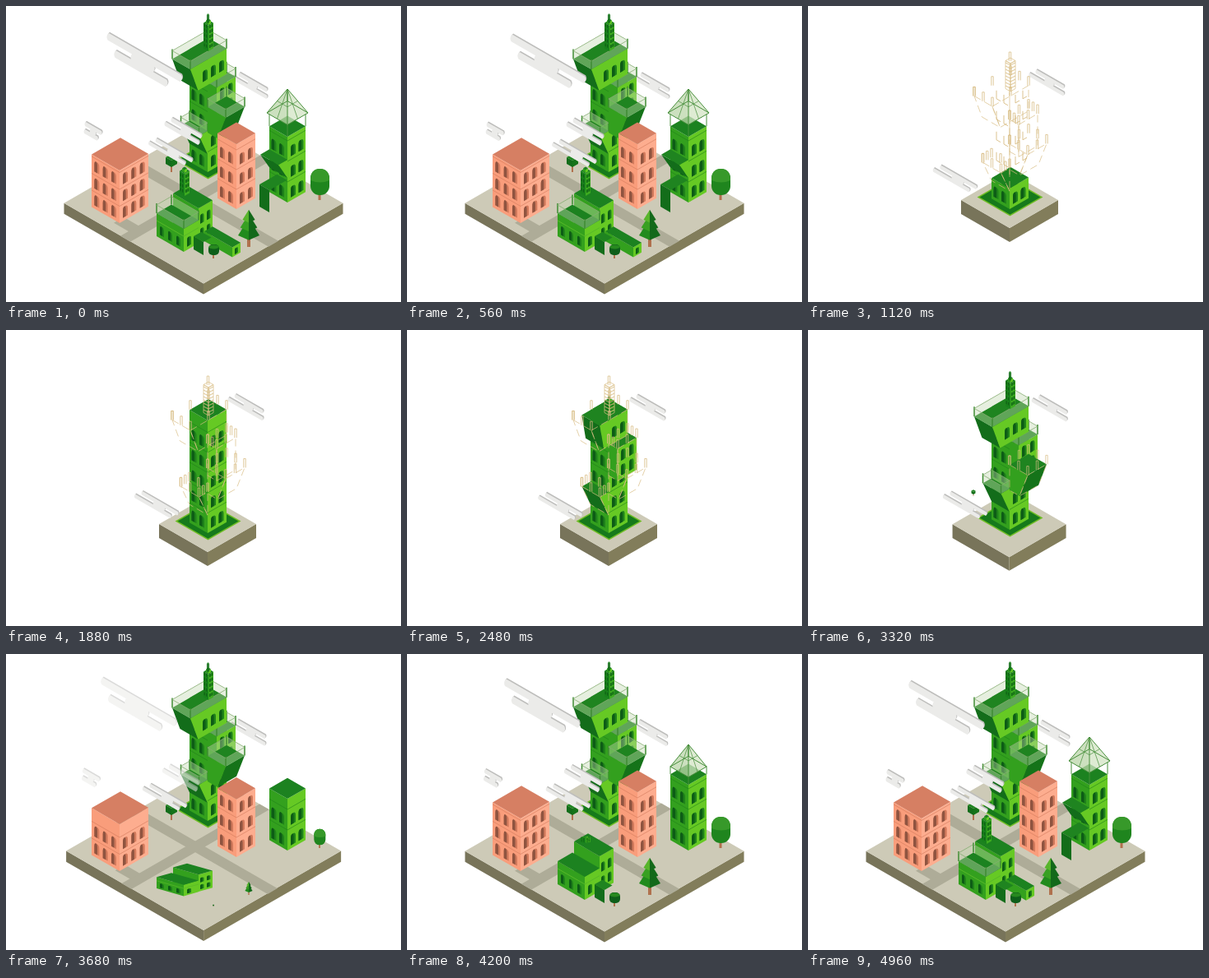
Recreate the animation shown at these times as an HTML page. Size 480x360 px, loop 5 s.

```html
<!DOCTYPE html>
<html lang="en">
<head>
<meta charset="utf-8">
<title>Isometric green city</title>
<style>
html, body { margin: 0; width: 100%; height: 100%; overflow: hidden; background: #fff; }
svg { display: block; width: 100vw; height: 100vh; }
</style>
</head>
<body>
<svg id="stage" viewBox="0 0 480 360"></svg>
<script>
const LOOP = 5000, CUT = 700, K = 0.577;
// Colours are ordered left side, right side, top.
const GREEN = ['#33a01e', '#66c924', '#1c8220'];
const DARK = ['#136d1a', '#157319', '#1f8420'];
const PINK = ['#f99d7b', '#fdad8f', '#d67f63'];
const GREEN_WIN = ['#1f821a', '#0d5c16'];
const PINK_WIN = ['#d27a5c', '#8f5440'];
const WIRE = '#d9bd84';
const stage = document.getElementById('stage');

const mix = (a, b, p) => a + (b - a) * p;
const part = (t, a, b) => Math.min(1, Math.max(0, (t - a) / (b - a)));
const inOut = p => p < 0.5 ? 4 * p ** 3 : 1 - (2 - 2 * p) ** 3 / 2;
const out = p => 1 - (1 - p) ** 3;
const seq = (n, from, step) => Array.from({ length: n }, (_, i) => from + i * step);

const poly = (fill, ...pts) => `<polygon points="${pts}" fill="${fill}"/>`;
const line = (color, width, ...pts) =>
  `<polyline points="${pts}" fill="none" stroke="${color}" stroke-width="${width}"/>`;
const group = (attrs, body) => `<g ${attrs}>${body}</g>`;
const fade = (o, body) => o > 0 ? group(`opacity="${o}"`, body) : '';
const shift = (y, body) => group(`transform="translate(0 ${y})"`, body);
const grow = (p, x, y, body, sx = p) => p > 0
  ? group(`transform="translate(${x} ${y}) scale(${sx} ${p}) translate(${-x} ${-y})"`, body) : '';

// Projection around a ground point: u runs down-right, v down-left, z up.
const iso = (x, y) => (u, v, z) => [x + u - v, y + (u + v) * K - z];

// Left, right and top faces; fu and fv pull the foot in to make a taper.
function faces(o, [u0, u1], [v0, v1], [z0, z1], fu = u1, fv = v1) {
  return [
    [o(u0, v1, z1), o(u1, v1, z1), o(fu, fv, z0), o(u0, fv, z0)],
    [o(u1, v1, z1), o(u1, v0, z1), o(fu, v0, z0), o(fu, fv, z0)],
    [o(u0, v1, z1), o(u1, v1, z1), o(u1, v0, z1), o(u0, v0, z1)]
  ];
}
const solid = (cols, ...shape) => faces(...shape).map((f, i) => poly(cols[i], f)).join('');
const box = (x, y, a, b, h, cols) => solid(cols, iso(x, y), [-a, 0], [-b, 0], [0, h]);

// Arched windows beside the corner (x, y); side -1 is left, 1 is right.
function arches(x, y, side, us, vs, w, h, limit, [pale, dark]) {
  const arch = (u, v, w) => {
    const at = (du, dv) => `${x + side * (u + du)} ${y - (u + du) * K - v - dv}`;
    return `M${at(0, 0)}L${at(0, h * 0.7)}Q${at(0, h)} ${at(w / 2, h)}` +
      `Q${at(w, h)} ${at(w, h * 0.7)}L${at(w, 0)}Z`;
  };
  let wide = '', thin = '';
  for (const v of vs) if (v + h <= limit) for (const u of us) {
    wide += arch(u, v, w);
    thin += arch(side < 0 ? u + w * 0.4 : u, v, w * 0.6);
  }
  return `<path d="${wide}" fill="${pale}"/><path d="${thin}" fill="${dark}"/>`;
}
const bothSides = (x, y, ...rest) => arches(x, y, -1, ...rest) + arches(x, y, 1, ...rest);

// Building of equal storeys, cut off at its current height.
function block(x, y, a, b, h, storey, cols, win, n, w) {
  if (h <= 0) return '';
  let s = box(x, y, a, b, h, cols);
  for (let z = storey; z < h - 2; z += storey)
    s += line(win[0], 0.6, x - a, y - a * K - z, x, y - z, x + b, y - b * K - z);
  return s + bothSides(x, y, seq(n, 4, (a - 3) / n), seq(6, 4, storey), w, 13, h, win);
}

// Thin striped mast with a small cap.
function mast(x, y, r, h) {
  return box(x, y, r, r, h, ['#18821b', '#3dab20', GREEN[2]]) +
    bothSides(x, y, [r * 0.2, r * 0.6], seq(Math.floor(h / 6), 3, 6), r * 0.3, 4, h, GREEN_WIN) +
    box(x, y - h - 1, r / 2, r / 2, 4, GREEN);
}

const ring = (o, [u0, u1], [v0, v1], z) =>
  [[u0, v1], [u0, v0], [u1, v0], [u1, v1], [u0, v1]].map(([u, v]) => o(u, v, z));

function rail(o, u, v, z, h = 10) {
  const pts = ring(o, u, v, z);
  let glass = '', posts = '';
  for (let i = 0; i < 4; i++) {
    const [x, y] = pts[i], [x2, y2] = pts[i + 1];
    glass += poly('#c3d8b0', x, y, x2, y2, x2, y2 - h, x, y - h);
    posts += line('#3f8c33', 1.5, x, y, x, y - h - 2) + line('#86ad72', 0.8, x, y - h, x2, y2 - h);
  }
  return group('opacity=".4"', glass) + posts;
}

// Open porch: a roof and one wall.
function porch(o, u, v, z) {
  const [wall, , roof] = faces(o, u, v, z);
  return poly(DARK[2], roof) + poly(DARK[0], wall);
}

// Two parallel bars joined by a short one; the lower starts at dx.
function cloud(x, y, len, th, dx, low) {
  const bar = (from, to, drop, ox, oy) => {
    const n = (to - from) * len;
    return `M${x + from * len + ox} ${y + from * len * K + drop * th + oy}l${n} ${n * K}` +
      `q${th / 3} ${th * 0.6} ${-th / 6} ${th}l${-n} ${-n * K}q${-th / 3} ${-th * 0.6} ${th / 6} ${-th}z`;
  };
  const shape = (fill, ox, oy) => `<path fill="${fill}" d="${bar(0, 1, 0, ox, oy)}` +
    `${bar(dx, dx + low, 1.9, ox, oy)}${bar(0.33, 0.62, 0.95, ox, oy)}"/>`;
  return shape('#bdbdbb', 1, -1.2) + shape('#ebebe9', 0, 0);
}

function base(e, start) {
  const w = mix(59, 169.5, e) * start, x = mix(245, 240, e), y = mix(236, 239.7, e);
  const th = mix(17, 13, e), h = w * K;
  const road = (x1, y1, len, dir) => {
    const x2 = x1 + len, y2 = y1 + dir * len * K;
    return poly('#aeac98', x1, y1, x2, y2, x2 + 12, y2 - dir * 7, x1 + 12, y1 - dir * 7);
  };
  const roads = road(149, 195, 170, 1) + road(139, 280, 170, -1) + road(131, 264, 19, 1);
  return poly('#78745a', x - w, y, x, y + h, x, y + h + th, x - w, y + th) +
    poly('#827d5b', x + w, y, x, y + h, x, y + h + th, x + w, y + th) +
    poly('#cdcab7', x - w, y, x, y - h, x + w, y, x, y + h) +
    group(`transform="translate(${x} ${y}) scale(${w / 169.5}) translate(-240 -240)"`,
      fade(part(e, 0.25, 0.7), roads));
}

// Overhangs of the tall tower: extent, height, how far the foot reaches, timing.
const foot = iso(245, 247);
const OVERHANGS = [
  { u: [0, 11], v: [-23, 0], z: [70, 109], reach: 1, from: 2000, to: 2450, fence: 2950 },
  { u: [-22, 0], v: [-23, 21], z: [106, 137], reach: 0.55, from: 2300, to: 2660, fence: 2950 },
  { u: [-22, 0], v: [0, 10.5], z: [22, 50], reach: 0, from: 2000, to: 2450, fence: 2950 },
  { u: [0, 22], v: [-23, 0], z: [48, 79], reach: 0.55, from: 2700, to: 3100, fence: 3350 }
];

function overhang({ u, v, z, reach, from, to, fence }, t) {
  const p = inOut(part(t, from, to));
  if (!p) return '';
  const u1 = u[1] * p, v1 = v[1] * p, fu = u1 * reach, fv = v1 * reach;
  const cols = [fv < v1 ? DARK[0] : GREEN[0], fu < u1 ? DARK[1] : GREEN[1], DARK[2]];
  let s = solid(cols, foot, [u[0], u1], [v[0], v1], z, fu, fv);
  if (reach === 1) {
    const [x, y] = foot(u1, 0, z[0]);
    s += arches(x, y, 1, [4, 14], [4, 22], 5.5, 13, 99, GREEN_WIN);
  } else if (fu === u1 && z[1] > 100) {
    s += arches(245, 247, 1, seq(p > 0.6 ? 3 : 2, p > 0.6 ? -6 : 4, 10), [113], 6, 13, 999, GREEN_WIN);
  }
  return s + fade(part(t, fence, fence + 200), rail(foot, u, v, z[1]));
}

function wires(t) {
  const post = ([x, y]) => line(WIRE, 0.8, x - 1.2, y, x - 1.2, y - 11, x + 1.2, y - 11, x + 1.2, y);
  const edge = f => line(WIRE, 0.7, f, f[0]);
  const shown = end => part(t, 740, 1000) * (1 - part(t, end - 200, end));
  let s = '';
  for (const { u, v, z, reach, to } of OVERHANGS) {
    const sides = faces(foot, u, v, z, u[1] * reach, v[1] * reach).slice(0, 2);
    const pts = ring(foot, u, v, z[1]);
    const mid = pts.slice(1).map(([x, y], i) => [(x + pts[i][0]) / 2, (y + pts[i][1]) / 2]);
    s += fade(shown(to + 400), group('stroke-dasharray="9 5"', sides.map(edge).join('')) +
      [...pts, ...mid].map(post).join(''));
  }
  let core = line(WIRE, 0.7, 245, 105, 245, 205);
  for (const z of seq(4, 50, 25)) for (const side of [-1, 1]) for (const d of [7, 16]) {
    const x = 245 + side * d, y = 247 - d * K - z;
    core += line(WIRE, 0.9, x, y - 10, x, y, x + 5, y - side * 5 * K);
  }
  const spire = seq(8, 72, 4).map(y => line(WIRE, 0.9, 240, y - 3, 246, y, 252, y - 3)).join('') +
    faces(iso(246, 104), [-6, 0], [-6, 0], [0, 34]).map(edge).join('') + post([245.5, 67]);
  return s + fade(shown(1850), core) + fade(shown(2850), spire);
}

function tower(t) {
  const pad = r => [245.5 - r, 232.5, 245.5, 232.5 - r * K, 245.5 + r, 232.5, 245.5, 232.5 + r * K];
  const h = 25 * out(part(t, 900, 1090)) + 112 * part(t, 1120, 1800);
  const spire = mast(246, 100, 6, 31) + box(245.5, 66, 1.5, 1.5, 10, DARK);
  return grow(out(part(t, 760, 920)), 245, 233, poly('#6fbd25', pad(40)) + poly('#167a1b', pad(37))) +
    block(245, 247, 22, 23, h, 24.5, GREEN, GREEN_WIN, 2, 6) +
    OVERHANGS.map(o => overhang(o, t)).join('') +
    grow(out(part(t, 2400, 2880)), 246, 100, spire, 1) + wires(t);
}

function glassTower(t) {
  const o = iso(342, 239), c = '#478f3b';
  let s = block(342, 239, 22, 22, 80 * out(part(t, 3480, 3980)), 25, GREEN, GREEN_WIN, 2, 6);
  const g = inOut(part(t, 4250, 4650)), w = mix(22, 25, g), y = mix(137, 130, g), peak = mix(110, 101, g);
  const top = [342, peak], L = [342 - w, y], R = [342 + w, y], F = [342, y + w * K], B = [342, y - w * K];
  const half = (a, b) => [(a[0] + b[0]) / 2, (a[1] + b[1]) / 2];
  const posts = [[-22, 0], [0, 0], [0, -22]].map(([u, v]) =>
    line(c, 1, o(u, v, 80), o(u, v, 80 + y * 0 + mix(10, 15, g)))).join('');
  const roof = posts +
    group('opacity=".75"', poly('#bcd6aa', L, top, F) + poly('#d3e5c5', R, top, F)) +
    line(c, 1, L, top, R, F, L, B, R) + line(c, 1, F, top, B) +
    line(c, 0.7, half(L, top), half(F, top), half(R, top)) +
    line(c, 0.7, half(L, F), top, half(R, F));
  s += grow(out(part(t, 3850, 4100)), 342, 150, roof);

  const p = inOut(part(t, 4350, 4700)), q = inOut(part(t, 4600, 4900));
  if (p) s += solid([DARK[0], GREEN[1], DARK[2]], o, [-22, 0], [0, 11 * p], [30, 52], 0, 0);
  if (q) s += porch(o, [-12.6, -0.6], [0, 21.4 * q], [0, 27]);
  return s;
}

function house(t) {
  const p = out(part(t, 3580, 4080)), o = iso(216, 299);
  const rear = box(234, 288, 31, 17, 42, GREEN) +
    arches(234, 288, 1, [2, 10], [5, 22], 4.5, 11, 99, GREEN_WIN);
  const front = box(216, 299, 33, 18, 28, GREEN) + bothSides(216, 299, [4], [4], 5, 11, 99, GREEN_WIN) +
    arches(216, 299, -1, [14, 24], [4], 5, 11, 99, GREEN_WIN) +
    line('#57b928', 1, o(-33, 0, 19), o(0, 0, 19), o(0, -18, 19));
  const stack = 0.22 * part(t, 4050, 4180) + 0.78 * out(part(t, 4220, 4600));
  let s = grow(p, 217, 290, rear, 1) + grow(stack, 217, 229, mast(217, 231, 6, 27), 1) +
    grow(p, 217, 290, front, 1) +
    fade(part(t, 4500, 4780), rail(o, [-33, 0], [-18, 0], 28));
  const len = 34 * part(t, 4867, 5000);
  if (len) {
    const x = 241 + len, y = 286 + len * K;
    s += box(x, y, len, 10, 12, GREEN) + arches(x, y, 1, [3], [2], 4, 7, 99, GREEN_WIN);
  }
  return s + grow(out(part(t, 3800, 4100)), 234, 285, porch(o, [3.5, 15.5], [-18, -8.5], [0, 16]));
}

function trees(t) {
  const trunk = (x, y, h, w = 2) =>
    `<rect x="${x - w / 2}" y="${y - h}" width="${w}" height="${h}" fill="#b0714e"/>`;
  const tier = i => {
    const w = 13 - i * 2.7, y = 279 - i * 9.5, top = y - w * 1.6, low = y + w * 0.45;
    return poly(['#218b1d', '#38a022', '#58b52c'][i], 295, top, 295 - w, y, 295, low) +
      poly('#13691a', 295, top, 295 + w, y, 295, low);
  };
  const pop = (from, x, y, body) => grow(out(part(t, from, from + 450)), x, y, body);
  return {
    cube: pop(3260, 201, 202, trunk(201, 202, 10) + box(201, 196, 7, 7, 8, DARK)),
    oak: pop(3560, 381, 236, trunk(381, 236, 12, 3) +
      '<rect x="370" y="198" width="23" height="32" rx="11" fill="#1f851e"/>' +
      '<path d="M370 212q0-14 11.500-14t11.500 14q-11 5-23 0z" fill="#37992a"/>'),
    fir: pop(3620, 295, 293, trunk(295, 293, 10, 4) + seq(3, 0, 1).map(tier).join('')),
    bush: pop(3660, 252, 307, trunk(252, 307, 8) +
      '<rect x="246" y="290" width="13" height="13" rx="5" fill="#0e5f1a"/>' +
      '<ellipse cx="252.500" cy="293" rx="6" ry="2.500" fill="#27891f"/>')
  };
}

function draw(now) {
  const t = now < CUT ? now + LOOP : now;
  const s = (t - LOOP) / 1000;
  const e = inOut(part(t, 3132, 3800));
  const lift = -45 * e, tree = trees(t);
  const drift = (v, x, y, ...form) => cloud(x + v * s, y + v * s * K, ...form);
  const rise = out(part(t, 3420, 3920));

  stage.innerHTML = base(e, out(part(t, CUT, CUT + 160))) +
    drift(1.6, 284, 81, 33, 4.5, -0.25, 1.25) + tree.cube +
    shift(lift, tower(t)) +
    shift(45 + lift, drift(5.5, 183, 161, 43, 4.5, -0.2, 1)) +
    block(280, 247, 23, 23, 79 * rise, 24, PINK, PINK_WIN, 2, 6) +
    glassTower(t) + tree.oak +
    block(138, 264, 34, 35, 64 * rise, 20.5, PINK, PINK_WIN, 3, 6) +
    house(t) + tree.bush + tree.fir +
    fade(part(t, 3480, 3850), drift(5.5, 125, 33, 88, 8.5, 0.1, 0.7) +
      drift(2, 97, 141, 19, 5, -0.05, 0.8) + drift(2, 202, 136, 35, 5, -0.23, 1.15));
}

function frame(now) {
  draw(now % LOOP);
  requestAnimationFrame(frame);
}
draw(0);
requestAnimationFrame(frame);
</script>
</body>
</html>
```
